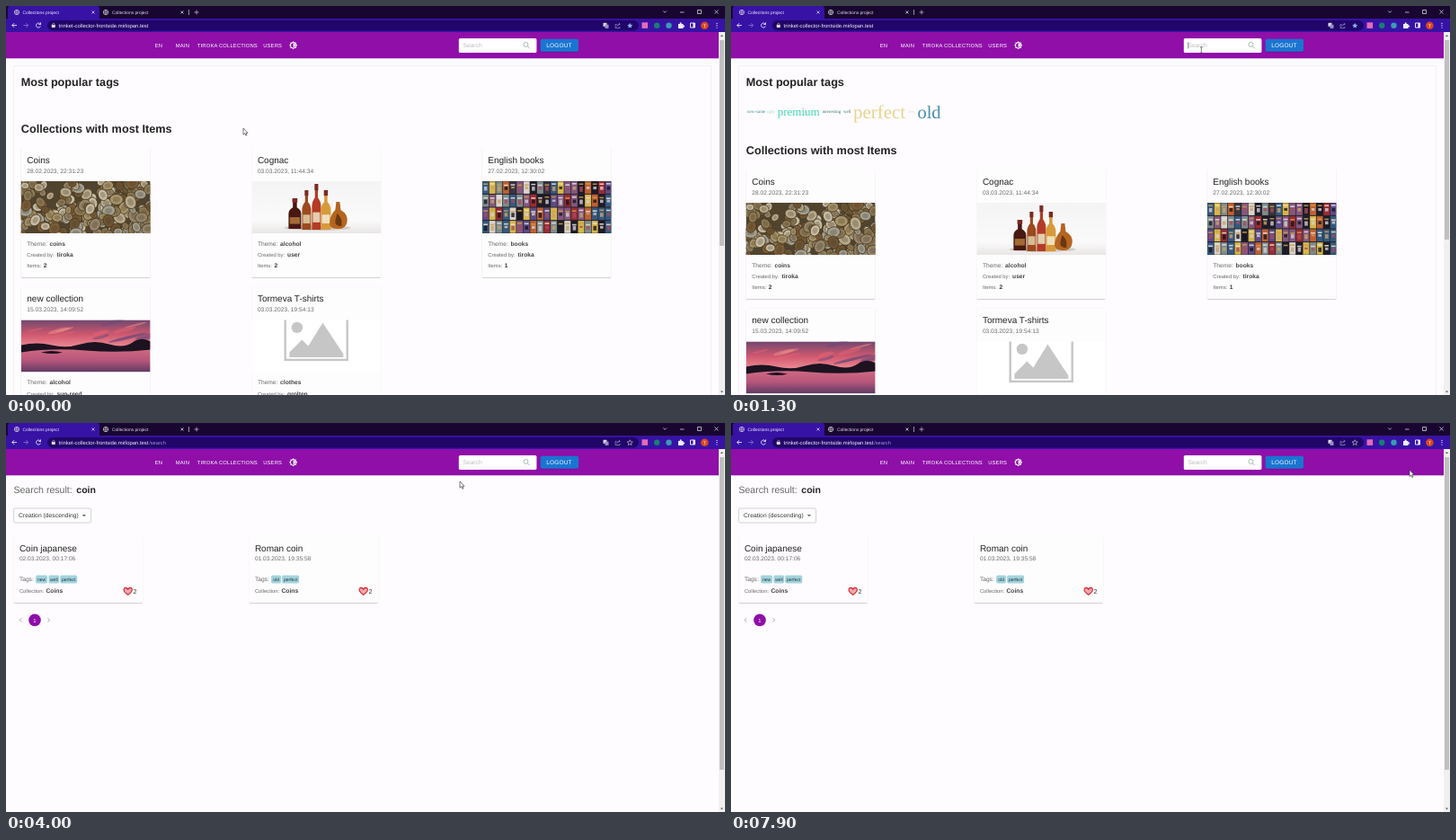
An HTML page that plays this animation: 800 by 433 pixels, repeating every 8000 ms.

```html
<!DOCTYPE html>
<html lang="en">
<head>
<meta charset="utf-8">
<title>Collections project</title>
<style>
html, body { margin: 0; width: 100%; height: 100%; overflow: hidden; background: #fefcfe; }
svg#stage { display: block; width: 100%; height: 100%; }
text { font-family: "Liberation Sans", Arial, sans-serif; text-rendering: geometricPrecision; white-space: pre; }
.serif { font-family: "Liberation Serif", serif; }
.b { font-weight: bold; }
.caps { letter-spacing: .167px; }
</style>
</head>
<body>
<svg id="stage" viewBox="0 0 800 433"></svg>
<script>
const GREY = '#6b696b', DARK = '#222', PURPLE = '#8f0fa8';
let seed = 7;
const rnd = () => (seed = seed * 16807 % 2147483647) / 2147483647;
const pick = list => list[Math.floor(rnd() * list.length)];
const repeat = (n, fn) => Array.from({ length: n }, (_, i) => fn(i)).join('');

const text = (x, y, s, size, fill = DARK, cls = '', more = '') =>
  `<text x="${x}" y="${y}" font-size="${size}" fill="${fill}" class="${cls}" ${more}>${s}</text>`;
const rect = (x, y, w, h, fill, more = '') =>
  `<rect x="${x}" y="${y}" width="${w}" height="${h}" fill="${fill}" ${more}/>`;
const disc = (x, y, r, fill, more = '') =>
  `<circle cx="${x}" cy="${y}" r="${r}" fill="${fill}" ${more}/>`;
const line = (d, color, w = .8, more = '') =>
  `<path d="${d}" fill="none" stroke="${color}" stroke-width="${w}" ${more}/>`;
const shape = (d, fill, more = '') => `<path d="${d}" fill="${fill}" ${more}/>`;
const gradient = (id, stops) => `<linearGradient id="${id}" x2="0" y2="1">` +
  stops.map(([o, c]) => `<stop offset="${o}" stop-color="${c}"/>`).join('') + '</linearGradient>';

// Pictures, each 143.5 by 58
const coins = () => rect(0, 0, 144, 58, '#51442f') + repeat(190, () => {
  const x = rnd() * 146, y = rnd() * 60, r = 4 + rnd() * 4, a = rnd() * 180;
  const spin = `transform="rotate(${a} ${x} ${y})"`;
  const c = pick(['#a8946a', '#8d7a55', '#b9ac8e', '#7b5c38', '#c7bda3', '#96856b', '#6d5433', '#a3a092']);
  return `<ellipse cx="${x}" cy="${y}" rx="${r}" ry="${r * .8}" fill="${c}" stroke="#43351f" stroke-width=".7" ${spin}/>` +
    `<ellipse cx="${x}" cy="${y}" rx="${r * .55}" ry="${r * .42}" fill="#4a3b24" opacity=".28" ${spin}/>`;
});

const bottle = (x, top, w, h, glass, label) =>
  rect(x + w * .34, top, w * .32, h * .4, glass) + rect(x + w * .3, top, w * .4, h * .14, '#7a2b25') +
  shape(`M${x + w * .34} ${top + h * .3}Q${x} ${top + h * .38} ${x} ${top + h * .5}V${top + h}h${w}V${top + h * .5}Q${x + w} ${top + h * .38} ${x + w * .66} ${top + h * .3}z`, glass) +
  rect(x + w * .1, top + h * .62, w * .8, h * .22, label);
const bottles = () => rect(0, 0, 144, 58, 'url(#studio)') +
  '<ellipse cx="73" cy="52" rx="37" ry="3" fill="#bdb7b2" opacity=".6"/>' +
  bottle(41, 19, 14, 34, '#481812', '#a26b36') + bottle(56, 10, 10, 44, '#9c4a1d', '#d7bc93') +
  bottle(67, 3, 10, 51, '#b43b24', '#e0cfae') + bottle(77, 10, 11, 44, '#d79a3a', '#efe0bb') +
  shape('M94 23h4l1 9q9 5 7 14q-2 8-11 7q-10 0-8-9q1-7 6-12z', '#b5651f') +
  shape('M95 36q6 4 5 14q-8 0-7-6z', '#6b3714');

const books = () => rect(0, 0, 144, 58, '#25222b') + repeat(76, i => {
  const x = i % 19 * 7.6, y = Math.floor(i / 19) * 14.6;
  const c = pick(['#1d1b26', '#9c2b32', '#5d4a86', '#d7b64a', '#d9d3cb', '#34597f', '#c0602f', '#39343e', '#85577e', '#7d8c8c']);
  return rect(x + .3, y + .3, 6.9, 13.6, c) +
    rect(x + 1.3, y + 2 + rnd() * 2, 4.8, 1.6, pick(['#f0e6cf', '#cf9f4c', '#e8e2e6']), 'opacity=".85"') +
    rect(x + 2, y + 6, 3.6, 2 + rnd() * 4, pick(['#c9a56f', '#17141d', '#ab4b5c', '#d8cfd5']), 'opacity=".8"');
});

const sunset = () => rect(0, 0, 144, 33, 'url(#dusk)') + rect(0, 32, 144, 26, 'url(#lake)') +
  repeat(14, i => {
    const x = rnd() * 140, y = 3 + rnd() * 19;
    return `<ellipse cx="${x}" cy="${y}" rx="${8 + rnd() * 15}" ry="${1 + rnd() * 1.6}" fill="${pick(['#f08b86', '#6d4a78', '#e8626f'])}" opacity=".55" transform="rotate(-14 ${x} ${y})"/>`;
  }) +
  shape('M0 28Q18 24 34 28T66 27T98 27T124 25T144 24V33Q110 37 72 34T0 36z', '#1c1220') +
  shape('M22 36q12-3 24 0q-10 3-24 0z', '#1a111e');

const noPhoto = () => rect(0, 0, 144, 58, '#fff') +
  rect(37.3, -3, 69, 47.5, 'none', 'stroke="#c6c6c6" stroke-width="2.4"') +
  disc(50.5, 8.5, 6.2, '#c6c6c6') +
  shape('M42 41.5V36L56 22L63 29L79 3L102 38V41.5z', '#c6c6c6');

const paper = (x, y, h, id = '') =>
  rect(x, y + .8, 143.6, h, '#c4c2c4', 'rx="1.6"') + rect(x - .4, y, 144.4, h, '#f3f1f3', 'rx="1.6"') +
  rect(x, y, 143.6, h, '#fefdfe', `rx="1.6" ${id}`);

const card = (x, y, title, date, photo, theme, owner, count) => paper(x, y, 144) +
  text(x + 6.5, y + 17, title, 10) + text(x + 6.5, y + 27.6, date, 6.65, GREY) +
  `<svg x="${x}" y="${y + 37}" width="143.6" height="58">${photo()}</svg>` +
  text(x + 6.5, y + 109, 'Theme:', 6.65, GREY) + text(x + 31.7, y + 109, theme, 6.67, '#444', 'b') +
  text(x + 6.5, y + 121.2, 'Created by:', 5.87, GREY) + text(x + 39.7, y + 121.2, owner, 6.67, '#444', 'b') +
  text(x + 6.5, y + 133.2, 'Items:', 5.87, GREY) + text(x + 25, y + 133.2, count, 6.67, '#333', 'b');

const chip = (x, w, s) => rect(x, 169.6, w, 8.8, '#a3d3dc', 'rx="1.6"') +
  text(x + w / 2, 175.7, s, 5.05, '#234', '', 'text-anchor="middle"');

const result = (x, id, title, date, chips) => paper(x, 126, 74, `id="${id}"`) +
  text(x + 6.5, 142.6, title, 10) + text(x + 6.5, 153, date, 6.6, GREY) +
  text(x + 6.5, 176.4, 'Tags:', 6.67, GREY) + chips.map(([dx, w, s]) => chip(x + dx, w, s)).join('') +
  text(x + 6.5, 188.6, 'Collection:', 5.85, GREY) + text(x + 36, 188.6, 'Coins', 6.75, '#444', 'b') +
  shape('m0 4C-9-2-2.5-6.5 0-2.2C2.5-6.5 9-2 0 4z', '#f5a9ae', `transform="translate(${x + 127.3} 187.3)" stroke="#d3202f" stroke-width="1.1"`) +
  text(x + 133, 189.7, '2', 7, '#333');

const globe = x => disc(x, 7, 2.7, 'none', 'stroke="#ddd" stroke-width=".7"') +
  line(`M${x - 2.6} 7h5.2M${x} 4.4q-2 2.6 0 5.2q2-2.6 0-5.2`, '#ddd', .5);
const cross = (x, y, r) => line(`M${x - r} ${y - r}l${2 * r} ${2 * r}m0 ${-2 * r}l${-2 * r} ${2 * r}`, '#eee', .7);
const STAR = 'M694.2 18.8l.9 2 2.2.2-1.7 1.4.5 2.2-1.9-1.2-1.9 1.2.5-2.2-1.7-1.4 2.2-.2z';

const browser = () => rect(0, 0, 800, 15, '#190630') + rect(2, 0, 102, 16, '#3712a5', 'rx="2.5"') +
  rect(0, 14, 800, 15, '#3712a5') + rect(46, 16, 658, 11.5, '#210568', 'rx="5.7"') +
  globe(12) + globe(111) + text(18.5, 8.8, 'Collections project', 4.96, '#f0ecf8') +
  text(118, 8.8, 'Collections project', 4.96, '#e2dce8') + cross(97, 7, 1.5) + cross(196, 7, 1.5) +
  line('M203.5 4v6M209.5 7h5M212 4.5v5', '#ccc', .7) +
  line('M731.3 5.5l1.8 1.8 1.8-1.8M750 7h4.5M769.5 4.5h4v4h-4z', '#eee', .7) + cross(790.5, 6.5, 2) +
  line('M12 21.5H6.8m2.4-2.4L6.8 21.5l2.4 2.4', '#fff') + line('M19.5 21.5h5.2m-2.4-2.4l2.4 2.4-2.4 2.4', '#8d79cf') +
  line('M38.2 20.2a2.5 2.5 0 1 0 .2 2.3M38.5 18.4v2.2h-2.2', '#fff') +
  rect(50.8, 21, 4, 3, '#ddd', 'rx=".4"') + line('M51.6 21v-1q1.2-1.8 2.4 0v1', '#ddd', .6) +
  text(58.6, 23.6, 'trinket-collector-frontside.mirlopan.test', 5.9, '#f4f0ff') +
  text(159.2, 23.6, '/search', 5.7, '#a394d8', '', 'id="path"') +
  rect(664.5, 18.8, 4, 4, '#ddd') + rect(666.5, 20.7, 4, 4.2, '#998ccc') +
  line('M679.5 20.5h-1.5v4h5v-1.5M679.5 23q.5-2.8 3.5-2.8m-1.2-1.4l1.3 1.4-1.3 1.4', '#b5a9df', .6) +
  shape(STAR, '#8ab4f8', 'id="star"') +
  rect(707.5, 18.3, 6.6, 6.6, '#e46bb5') + disc(724.2, 21.7, 3.2, '#15806f') + disc(737.5, 21.7, 3.2, '#3a9cae') +
  shape('M748 20h1.7q-.4-1.8 1-1.8t1 1.8h1.8v1.6q1.7-.3 1.7.9t-1.7 1v1.5H748z', '#eee') +
  line('M761.5 19h5v5h-5z', '#fff', .9) + rect(764.5, 19, 2, 5, '#fff') +
  disc(777.4, 21.7, 4.3, '#d9481c') + text(777.4, 23.6, 'T', 5.2, '#fff', '', 'text-anchor="middle"') +
  [19.4, 21.7, 24].map(y => disc(791, y, .6, '#fff')).join('');

const appBar = () => rect(0, 29, 793, 29.3, PURPLE) +
  [[165.7, 'EN'], [188.8, 'MAIN'], [212.8, 'TIROKA COLLECTIONS'], [286.2, 'USERS']]
    .map(([x, s]) => text(x, 45.8, s, 5.83, '#fff', 'caps')).join('') +
  rect(316.5, 40.6, 6.4, 6.4, '#fff') + rect(316.5, 40.6, 6.4, 6.4, '#fff', 'transform="rotate(45 319.7 43.8)"') +
  disc(319.7, 43.8, 2.6, PURPLE) + shape('M319.7 41.6a2.2 2.2 0 0 1 0 4.4z', '#fff') +
  rect(503.8, 36, 86.6, 16, '#fff', 'rx="1.6"') + disc(579.3, 44, 7.4, '#ededed', 'id="ring"') +
  text(508.5, 46.1, '', 6.67, '#333', '', 'id="query"') + rect(0, 40, .5, 7.5, '#222', 'id="caret"') +
  line('M580.2 44.7l2.7 2.7M580.9 42.9a2.5 2.5 0 1 1-5 0a2.5 2.5 0 1 1 5 0', '#666', .9, 'id="lens"') +
  rect(594.6, 37.6, 42.4, 14, '#5c0a70', 'rx="1.6" opacity=".5"') + rect(594.6, 36.7, 42.4, 14, '#1a75d1', 'rx="1.6"') +
  text(601.2, 46, 'LOGOUT', 6.5, '#fff', '', 'letter-spacing=".19"');

const tags = [[18, 119, 'new-same', 5, '#3b8f93'], [40, 119, 'ugly', 5, '#a6dcc0'], [51.7, 122, 'premium', 13, '#40d9b6'],
  [101.5, 119, 'interesting', 4.9, '#2a7a55'], [125, 119, 'well', 4.9, '#2f7a5c'], [136, 125, 'perfect', 20.9, '#e6d38c'],
  [197, 119, 'new', 5, '#dddcdc'], [207.5, 125, 'old', 20.4, '#478fa9']];

const home = () => line('M8.5 433V66.5H784.5V433', '#efedef', .8) +
  text(16.8, 88.7, 'Most popular tags', 12.68, DARK, 'b') +
  `<g id="tags">${tags.map(([x, y, s, size, c]) => text(x, y, s, size, c, 'serif')).join('')}</g><g id="list">` +
  text(16.8, 140.7, 'Collections with most Items', 12.7, DARK, 'b') +
  card(16.8, 158, 'Coins', '28.02.2023, 22:31:23', coins, 'coins', 'tiroka', 2) +
  card(273.4, 158, 'Cognac', '03.03.2023, 11:44:34', bottles, 'alcohol', 'user', 2) +
  card(529.8, 158, 'English books', '27.02.2023, 12:30:02', books, 'books', 'tiroka', 1) +
  card(16.8, 312.4, 'new collection', '15.03.2023, 14:09:52', sunset, 'alcohol', 'sun-reed', 1) +
  card(273.4, 312.4, 'Tormeva T-shirts', '03.03.2023, 19:54:13', noPhoto, 'clothes', 'grolten', 1) + '</g>';

const search = () => text(8.4, 78.2, 'Search result:', 10.6, '#666') + text(78.3, 78.2, 'coin', 10.5, DARK, 'b') +
  rect(8.6, 95, 86, 16, '#fefdfe', 'rx="1.7" stroke="#c2c0c2" stroke-width=".7" id="select"') +
  text(14, 105.4, 'Creation (descending)', 6.67, '#333', '', 'letter-spacing=".06"') +
  shape('M84.8 102h4.2l-2.1 2.2z', '#666') + '<g id="results">' +
  result(8.4, 'first', 'Coin japanese', '02.03.2023, 00:17:06', [[24.7, 13, 'new'], [39, 11.8, 'well'], [51.8, 19, 'perfect']]) +
  result(270.4, 'second', 'Roman coin', '01.03.2023, 19:35:58', [[24.7, 11, 'old'], [36.7, 19, 'perfect']]) +
  line('M17.2 217.3l-2 2.1 2 2.1M46.6 217.3l2 2.1-2 2.1', '#8a888a', .8) +
  disc(32, 219.4, 6.8, PURPLE) + text(32, 221.6, '1', 5.9, '#fff', '', 'text-anchor="middle"') + '</g>';

const pointers =
  shape('M0 0V7.2L1.7 5.7 2.8 8.2 4 7.7 2.9 5.3H5z', '#fff', 'id="arrow" stroke="#222" stroke-width=".6"') +
  line('M-1.2-3.4Q0-3.4 0-2.8Q0-3.4 1.2-3.4M0-3V3M-1.2 3.4Q0 3.4 0 2.8Q0 3.4 1.2 3.4', '#222', .6, 'id="beam"') +
  shape('M-.8.6Q0-.4.8.6V4L3 4.3 4.7 5.2V7.5L3.7 10H-.7L-3.2 6.5Q-3.2 5.2-2 5.6L-.8 6.6z', '#fff', 'id="hand" stroke="#222" stroke-width=".7"');

stage.innerHTML = '<defs>' +
  gradient('studio', [[0, '#f5f4f4'], [.75, '#fbfafa'], [1, '#e9e6e5']]) +
  gradient('dusk', [[0, '#71486f'], [.5, '#d0586f'], [1, '#f2929a']]) +
  gradient('lake', [[0, '#d06a82'], [.5, '#b7567b'], [1, '#5f3b63']]) + '</defs>' +
  rect(0, 0, 800, 433, '#fefcfe') + `<g id="home">${home()}</g><g id="search">${search()}</g>` +
  browser() + appBar() + rect(793, 29, 7, 404, '#f1f0f1') + rect(794, 38, 5, 229, '#c1c0c1', 'id="thumb"') +
  shape('M794.8 34h3.4l-1.7-2zM794.8 428.5h3.4l-1.7 2z', '#666') + `<g id="pointer">${pointers}</g>`;

const $ = id => document.getElementById(id);
const set = (id, attrs) => { for (const k in attrs) $(id).setAttribute(k, attrs[k]); };
const show = (id, on) => set(id, { visibility: on ? 'inherit' : 'hidden' });

// time, x, y, pointer shape
const route = [[0, 264, 136, 'arrow'], [400, 389.5, 96.5, 'arrow'], [700, 505, 56, 'arrow'], [800, 523.3, 49, 'beam'],
  [2600, 523.3, 49, 'beam'], [3000, 590, 44, 'hand'], [3400, 590, 44, 'hand'], [3600, 582, 44, 'hand'],
  [3900, 582, 44, 'arrow'], [4500, 120, 170, 'hand'], [4800, 100, 180, 'hand'], [5200, 100, 180, 'hand'],
  [5300, 413, 142, 'hand'], [5400, 450, 132, 'arrow'], [6000, 759, 54, 'arrow'], [6200, 759, 54, 'arrow'],
  [7000, 62, 92, 'arrow'], [7100, 62, 92, 'arrow'], [7700, 786, 21, 'arrow'], [7900, 755, 52.3, 'arrow'], [8000, 755, 52.3, 'arrow']];
const keys = [1500, 1700, 2100, 2300], CLICK = 3800;

function pointerAt(t) {
  const i = route.findIndex(p => p[0] > t) - 1;
  const [a, b] = [route[i], route[i + 1]], k = (t - a[0]) / (b[0] - a[0]);
  return [a[1] + (b[1] - a[1]) * k, a[2] + (b[2] - a[2]) * k, a[3]];
}

function draw(now) {
  const t = Math.floor(now % 8000 / 100) * 100;
  const found = t >= CLICK, loaded = t >= 600;
  show('home', !found);
  show('search', found);
  show('path', found);
  show('results', t >= CLICK + 200);
  show('tags', loaded);
  set('list', { transform: `translate(0 ${loaded ? 24 : 0})` });
  set('thumb', { height: found ? 348 : loaded ? 222 : 229 });
  set('star', found ? { fill: 'none', stroke: '#ddd', 'stroke-width': .6 } : { fill: '#8ab4f8', stroke: 'none' });

  const typed = found ? '' : 'coin'.slice(0, keys.filter(k => k <= t).length);
  const query = $('query');
  query.textContent = typed || 'Search';
  set('query', { fill: typed ? '#333' : '#bbb' });
  set('lens', { stroke: typed ? '#555' : '#9ab5a4' });
  show('ring', t >= 3000 && !found);
  const lastKey = Math.max(900, ...keys.filter(k => k <= t));
  show('caret', t >= 900 && !found && (t - lastKey) % 1000 < 500);
  set('caret', { x: 508.6 + (typed ? query.getComputedTextLength() : 0) });

  const tint = t >= 4500 ? Math.max(0, Math.min(1, (5600 - t) / 300)) : 0;
  const shade = Math.round(254 - 11 * tint);
  set('first', { fill: `rgb(${shade},${shade - 2},${shade})` });

  const [x, y, kind] = pointerAt(t);
  set('select', { stroke: found && x > 8 && x < 95 && y > 95 && y < 111 ? '#333' : '#c2c0c2' });
  set('pointer', { transform: `translate(${x} ${y})` });
  for (const id of ['arrow', 'beam', 'hand']) show(id, id === kind);
}

const start = performance.now();
(function tick() {
  draw(performance.now() - start);
  requestAnimationFrame(tick);
})();
</script>
</body>
</html>
```
